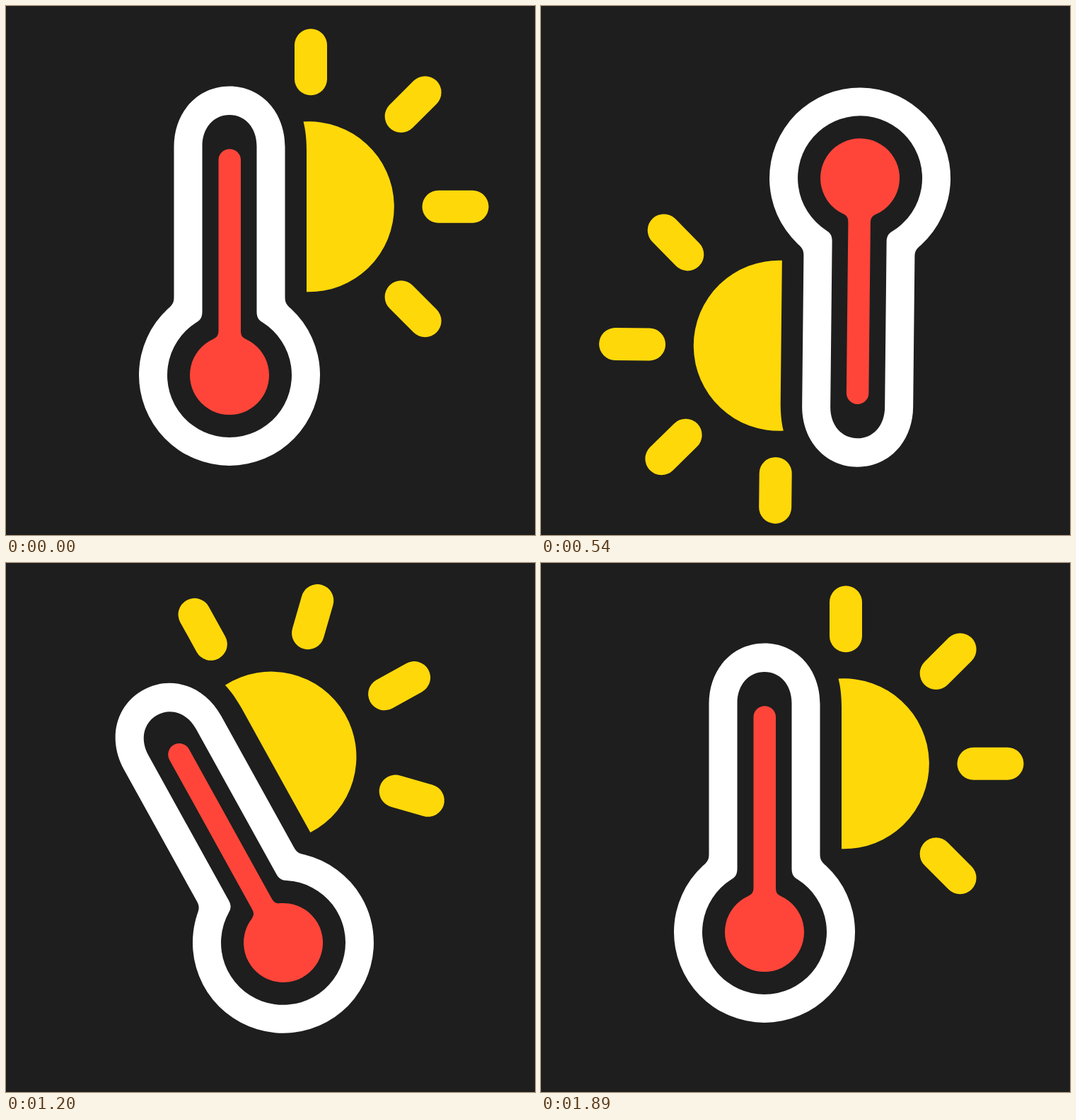
Recreate the animation shown at these times as an HTML page. Size 748x748 px, loop 2700 ms.

```html
<!DOCTYPE html>
<html lang="en">
<head>
<meta charset="utf-8">
<title>Spinning thermometer and sun</title>
<style>
  html, body { margin: 0; height: 100%; overflow: hidden; background: #1e1e1e; }
  svg { display: block; width: 100vw; height: 100vh; }
</style>
</head>
<body>
<svg viewBox="0 0 748 748">
  <g id="icon">
    <!-- glass -->
    <path fill="#fff" fill-rule="evenodd" d="
      M237.5 411V199C237.5 150 271 113.5 316 113.5S394.5 150 394.5 199V411
      C394.5 419 396 422 403 428A128 128 0 1 1 229 428C236 422 237.5 419 237.5 411Z
      M277.5 432V198C277.5 172 294 154 316 154S354.5 172 354.5 198V432
      C354.5 440 357 444 363 447.6A88 88 0 1 1 269 447.6C275 444 277.5 440 277.5 432Z"/>
    <!-- mercury -->
    <path fill="#ff453a" d="
      M300.5 458V218A15.75 15.75 0 0 1 332 218V458
      C332 465 333 468 339 471A56 56 0 1 1 293 471C299 468 300.5 465 300.5 458Z"/>
    <!-- sun -->
    <path fill="#ffd80a" d="
      M420.5 163.6A120.5 120.5 0 1 1 425 404.3V204C425 189 423.5 175 420.5 163.6Z"/>
    <g id="rays" stroke="#ffd80a" stroke-width="46" stroke-linecap="round"/>
  </g>
</svg>
<script>
const icon = document.getElementById('icon');
const LOOP = 2700, STEP = 30, START = 30, SPIN = 1845;

document.getElementById('rays').innerHTML = [-90, -45, 0, 45].map(a =>
  `<path d="M180.5 0H228.5" transform="translate(431 283.7) rotate(${a})"/>`).join('');

// One coordinate of a cubic Bezier from 0 to 1 with inner controls a and b
const bezier = (s, a, b) =>
  3 * (1 - s) ** 2 * s * a + 3 * (1 - s) * s * s * b + s ** 3;

// Easing with controls (.276, .225) and (.2395, 1), solved by bisection
function ease(x) {
  let lo = 0, hi = 1;
  for (let i = 0; i < 30; i++) {
    const mid = (lo + hi) / 2;
    if (bezier(mid, .276, .2395) < x) lo = mid;
    else hi = mid;
  }
  return bezier(hi, .225, 1);
}

function draw(now) {
  const t = Math.floor(now % LOOP / STEP) * STEP;
  const x = Math.min(1, Math.max(0, (t - START) / SPIN));
  const angle = x > 0 ? 360 * ease(x) : 0;
  icon.setAttribute('transform', `rotate(${angle} 382.8 382.3)`);
  requestAnimationFrame(draw);
}
draw(performance.now());
</script>
</body>
</html>
```
